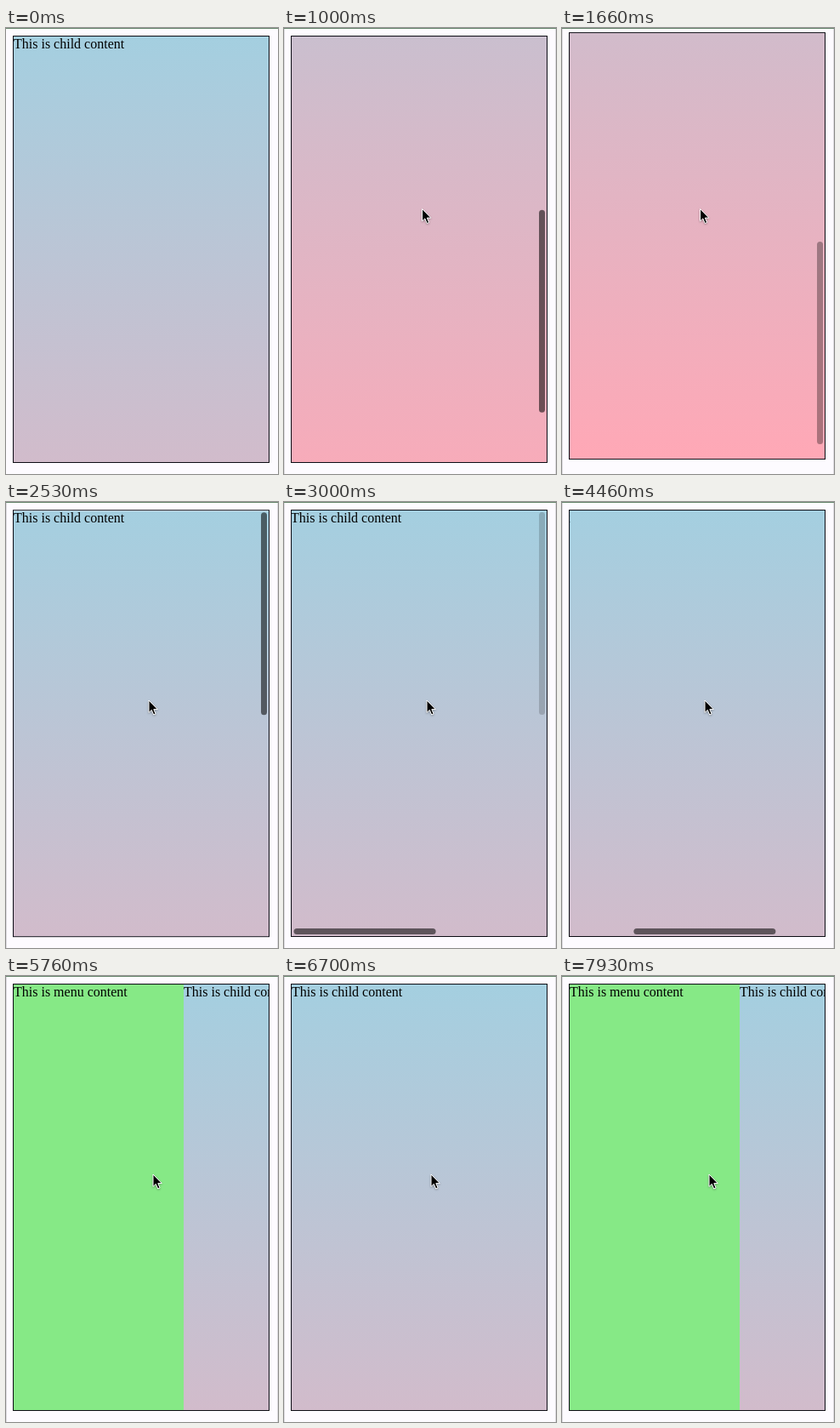
Animation of 320 by 524 pixels, one loop 8 s. Source, as an HTML page:

```html
<!DOCTYPE html>
<html lang="en">
<head>
<meta charset="utf-8">
<title>Drawer and nested scroll</title>
<style>
  html, body { margin: 0; width: 100%; height: 100%; overflow: hidden; background: #fdfbff; }
  #stage { position: relative; width: 320px; height: 524px; overflow: hidden; }
  #stage div, #stage svg { position: absolute; }
  #box {
    left: 8px; top: 9px; width: 300px; height: 500px;
    border: 1px solid #0c0c14; overflow: hidden;
    font: 16px/18px "Liberation Serif", Times, serif; color: #000; white-space: nowrap;
  }
  #menu { left: -200px; top: 0; width: 200px; height: 500px; background: #86e986; }
  #child { left: 0; top: 0; width: 300px; height: 500px; overflow: hidden; }
  #content {
    left: 0; top: 0; width: 500px; height: 1000px;
    background: linear-gradient(rgb(164,207,224), rgb(255,168,182));
  }
  .thumb { background: #000; border-radius: 3.5px; }
  #vThumb { left: 291px; top: 2px; width: 7px; height: 238px; }
  #hThumb { left: 2px; top: 491px; width: 167px; height: 7px; }
  #topLine { left: 0; top: 0; width: 320px; height: 1px; background: #66866c; }
  #sides { left: 0; top: 1px; width: 318px; height: 523px; border: solid #dddbe0; border-width: 0 1px; }
  #cursor { left: 0; top: 0; overflow: visible; filter: drop-shadow(0 1px 1px rgba(0,0,0,.3)); }
</style>
</head>
<body>
<div id="stage">
  <div id="box">
    <div id="menu">This is menu content</div>
    <div id="child">
      <div id="content">This is child content</div>
      <div id="vThumb" class="thumb"></div>
      <div id="hThumb" class="thumb"></div>
    </div>
  </div>
  <div id="sides"></div>
  <div id="topLine"></div>
  <svg id="cursor" width="12" height="20">
    <path d="M0 0V14.4L3.3 11.4 5.7 17 8.1 16 5.8 10.6H10.3Z" fill="#000" stroke="#fff" stroke-width="1"/>
  </svg>
</div>
<script>
const LOOP = 8000;
const SHADE = 0.55;
const el = id => document.getElementById(id);
const linear = p => p;
const easeOut = p => 1 - (1 - p) ** 2;
const easeInOut = p => p * p * (3 - 2 * p);

// Each track is a list of [time, value, easing into that value].
const tracks = {
  scrollY: [[860, 0], [1100, 500, easeOut], [1800, 500], [2330, 0, easeOut]],
  scrollX: [[3000, 0], [3400, 200, easeOut], [4330, 200], [4460, 131], [4680, 0, easeOut]],
  pageY: [[1430, 0], [1520, -8, easeOut], [1660, -4], [1800, 0, easeOut],
          [2530, 0], [2680, 13, easeOut], [2990, 0, easeInOut]],
  pageX: [[3730, 0], [3800, -17], [3900, -24, easeOut], [4250, 0, easeInOut]],
  vShade: [[860, 0], [861, SHADE], [1600, SHADE], [1660, 0.33], [1750, 0],
           [1800, 0], [1801, SHADE], [2830, SHADE], [3080, 0]],
  hShade: [[3000, 0], [3001, SHADE], [3750, SHADE], [3800, 0.46], [4000, 0],
           [4330, 0], [4331, SHADE], [5100, SHADE], [5330, 0]],
  menu: [[4850, 0], [5330, 200, easeOut], [6000, 200], [6600, 0, easeOut],
         [7600, 0], [7920, 200, easeOut]],
  mouseX: [[30, 296], [660, 162.5, easeInOut], [1780, 162.5], [1950, 168, easeInOut],
           [4700, 168], [4850, 173, easeInOut]],
  mouseY: [[30, 488], [660, 212.5, easeInOut], [1780, 212.5], [1950, 233, easeInOut]]
};

function valueAt(keys, t) {
  if (t <= keys[0][0]) return keys[0][1];
  for (let i = 1; i < keys.length; i++) {
    const [t0, v0] = keys[i - 1];
    const [t1, v1, ease = linear] = keys[i];
    if (t < t1) return v0 + (v1 - v0) * ease((t - t0) / (t1 - t0));
  }
  return keys[keys.length - 1][1];
}

function move(id, x, y) {
  el(id).style.transform = `translate(${x}px, ${y}px)`;
}

function draw(t) {
  const s = {};
  for (const name in tracks) s[name] = valueAt(tracks[name], t);
  move("box", s.pageX, s.pageY);
  move("menu", s.menu, 0);
  move("child", s.menu, 0);
  move("content", -s.scrollX, -s.scrollY);
  move("vThumb", 0, s.scrollY / 500 * 243);
  move("hThumb", s.scrollX / 200 * 113, 0);
  move("cursor", s.mouseX, s.mouseY);
  el("vThumb").style.opacity = s.vShade;
  el("hThumb").style.opacity = s.hShade;
  el("cursor").style.visibility = t < 30 ? "hidden" : "visible";
  el("sides").style.visibility = t < 860 ? "hidden" : "visible";
}

const start = performance.now();
function tick() {
  draw((performance.now() - start) % LOOP);
  requestAnimationFrame(tick);
}
draw(0);
requestAnimationFrame(tick);
</script>
</body>
</html>
```
